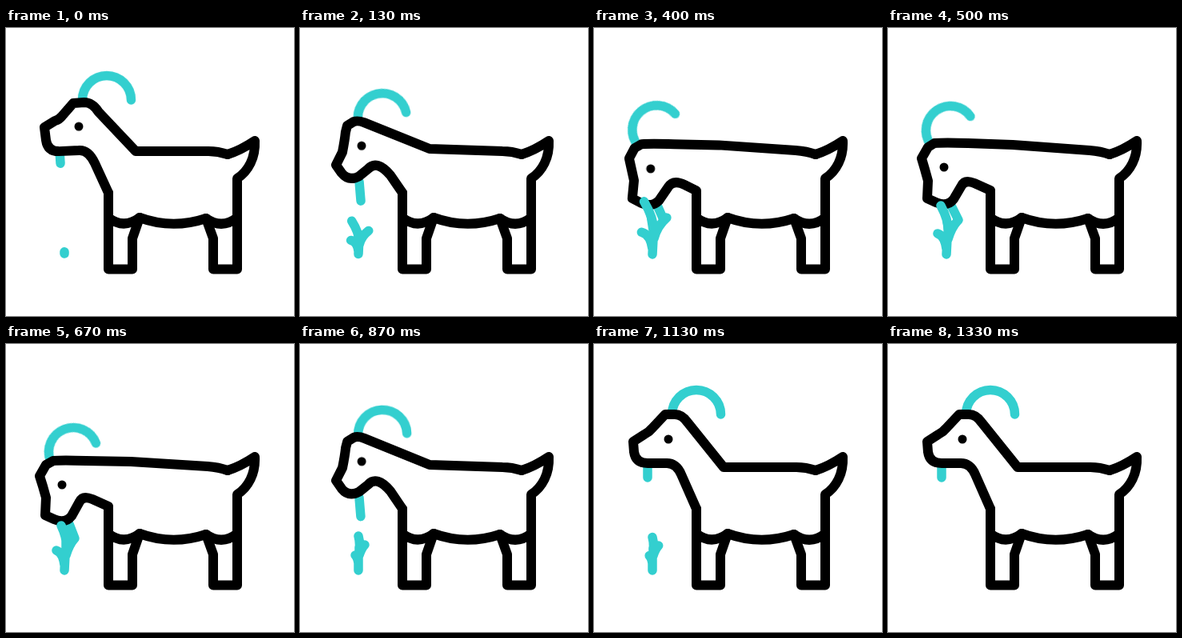
These frames come from a looping animation (360x360 px, 1.67 s). An HTML page:

```html
<!DOCTYPE html>
<html lang="en">
<head>
<meta charset="utf-8">
<title>Grazing goat</title>
<style>
html, body { margin: 0; height: 100%; overflow: hidden; background: #fff; }
svg {
  display: block; width: 100vw; height: 100vh;
  fill: none; stroke: #000; stroke-width: 12;
  stroke-linecap: round; stroke-linejoin: round;

  --head-mid: path("M277 158Q265 154 253 154L162 151L80 118Q72 115 67 117L59 122L57 130Q56 140 53 155L45 171L52 181Q61 192 74 185L85 176Q96 164 113 184L128 206");
  --stub: path("M73 283L73 264Q76 251 73 240M73 274Q72 267 69 264M74 254L74 264Q77 255 81 251");
  --sprout: path("M73 282L73 281Q73 281 73 280M73 282Q73 281 73 281M73 282L73 282Q73 281 73 280");
}
.teal { stroke: #33cfcf; stroke-width: 11.5; }
.move { animation: 1670ms infinite; }
#head { fill: #fff; animation-name: head; }
#eye { fill: #000; stroke: none; animation-name: eye; }
#horn { animation-name: horn; }
#beard { animation-name: beard; }
#grass { fill: #33cfcf; animation-name: grass; }

@keyframes head {
  0% {
    d: path("M277 158Q265 154 253 154L162 154L116 105Q108 93 98 93L84 94L70 110Q67 114 61 116L48 124L50 140Q52 154 66 154L91 153Q103 152 111 169L128 206");
    animation-timing-function: cubic-bezier(.4, .2, .7, .7);
  }
  7.8% { d: var(--head-mid); animation-timing-function: cubic-bezier(.3, .35, .6, 1); }
  16.17% {
    d: path("M277 158Q266 154 252 153L156 147L100 147Q70 147 62 147L52 152L47 163Q48 176 50 190L46 213L57 220Q70 226 80 218L93 203Q104 189 121 199L128 204");
    animation-timing-function: ease-in-out;
  }
  29.94%, 33% {
    d: path("M277 158Q266 154 252 153L156 146L100 144Q70 143 58 144L50 149L42 163Q46 176 50 191L49 213L60 218Q74 224 82 214L92 197Q96 189 108 194L128 203");
    animation-timing-function: ease-in-out;
  }
  40.12% {
    d: path("M277 158Q266 154 252 153L156 147L100 146Q70 145 59 146L50 151L42 165Q46 177 50 192L49 214L60 219Q74 225 82 215L92 197Q96 189 108 194L128 203");
    animation-timing-function: cubic-bezier(.45, 0, .8, .75);
  }
  52.1% { d: var(--head-mid); animation-timing-function: cubic-bezier(.3, .35, .7, .8); }
  59.88% {
    d: path("M277 158Q265 154 253 154L162 153L116 106Q107 94 97 95L83 95L69 113Q66 117 60 119L47 127L49 141Q52 156 66 156L91 154Q103 153 112 172L128 206");
    animation-timing-function: ease-out;
  }
  64.07%, 100% {
    d: path("M277 158Q265 154 253 154L162 154L117 98Q110 88 101 88L89 88L73 105Q69 110 63 113L49 122L50 135Q52 149 67 149L91 149Q103 149 109 163L128 206");
  }
}
@keyframes eye {
  0% { transform: translate(91px, 123px); animation-timing-function: cubic-bezier(.4, .2, .7, .7); }
  7.8% { transform: translate(77px, 147px); animation-timing-function: cubic-bezier(.3, .35, .6, 1); }
  16.17% { transform: translate(72px, 179px); animation-timing-function: ease-in-out; }
  29.94%, 33% { transform: translate(70px, 174px); animation-timing-function: ease-in-out; }
  40.12% { transform: translate(70px, 176px); animation-timing-function: cubic-bezier(.45, 0, .8, .75); }
  52.1% { transform: translate(77px, 147px); animation-timing-function: cubic-bezier(.3, .35, .7, .8); }
  59.88% { transform: translate(90px, 124px); animation-timing-function: ease-out; }
  64.07%, 100% { transform: translate(93px, 119px); }
}
@keyframes horn {
  0% { transform: translate(126px, 90px) rotate(0deg); animation-timing-function: cubic-bezier(.4, .2, .7, .7); }
  7.8% { transform: translate(103px, 112px) rotate(-12deg); animation-timing-function: cubic-bezier(.3, .35, .6, 1); }
  16.17% { transform: translate(79px, 126px) rotate(-50deg); animation-timing-function: ease-in-out; }
  29.94%, 33% { transform: translate(78px, 128px) rotate(-35deg); animation-timing-function: ease-in-out; }
  40.12% { transform: translate(84px, 135px) rotate(-21deg); animation-timing-function: cubic-bezier(.45, 0, .8, .75); }
  52.1% { transform: translate(103px, 113px) rotate(-2deg); animation-timing-function: cubic-bezier(.3, .35, .7, .8); }
  59.88% { transform: translate(124px, 92px) rotate(0deg); animation-timing-function: ease-out; }
  64.07%, 100% { transform: translate(128px, 88px) rotate(0deg); }
}
@keyframes beard {
  0% { d: path("M67 154L68 169"); animation-timing-function: cubic-bezier(.4, .2, .7, .7); }
  7.8% { d: path("M74 192L76 216"); animation-timing-function: cubic-bezier(.3, .35, .6, 1); }
  16.17% { d: path("M79 221L84 236"); animation-timing-function: ease-in-out; }
  29.94%, 33% { d: path("M79 222L88 240"); animation-timing-function: ease-in-out; }
  40.12% { d: path("M79 225L86 243"); animation-timing-function: cubic-bezier(.45, 0, .8, .75); }
  52.1% { d: path("M74 192L76 216"); animation-timing-function: cubic-bezier(.3, .35, .7, .8); }
  59.88% { d: path("M67 156L68 173"); animation-timing-function: ease-out; }
  64.07%, 100% { d: path("M67 150L67 167"); }
}
@keyframes grass {
  0% { d: var(--sprout); opacity: 1; animation-timing-function: cubic-bezier(.35, .2, .65, 1); }
  16.17% {
    d: path("M73 283L74 264Q78 241 58 210M73 276Q70 256 56 253M73 244L75 262Q79 244 96 232");
    animation-timing-function: linear;
  }
  29.94%, 33% { d: path("M73 283L74 264Q79 246 66 222M73 276Q71 260 62 257M76 250L75 264Q79 250 87 241"); }
  40.12% { d: path("M73 283L74 264Q79 248 69 227M73 276Q71 261 63 258M75 240L75 264Q79 251 85 244"); }
  52.1%, 65.87% { d: var(--stub); opacity: 1; animation-timing-function: ease-in-out; }
  79.63% { d: var(--sprout); opacity: 1; }
  79.64%, 100% { d: var(--sprout); opacity: 0; }
}
</style>
</head>
<body>
<svg viewBox="0 0 360 360">
  <path id="horn" class="teal move" d="M-30.5 0A30.5 30.5 0 0 1 30.5 0"/>
  <path id="beard" class="teal move" d="M67 150L67 167"/>
  <path id="head" class="move"/>
  <path d="M277 158Q293 153 311 141C312 162 303 179 289 188V301.5H259V263L250 238Q208 252 167 237L158 263V301.5H128V206"/>
  <path d="M128 237Q147 252 167 237M250 238Q270 252 289 237"/>
  <circle id="eye" class="move" r="5.5"/>
  <path id="grass" class="teal move"/>
</svg>
</body>
</html>
```
